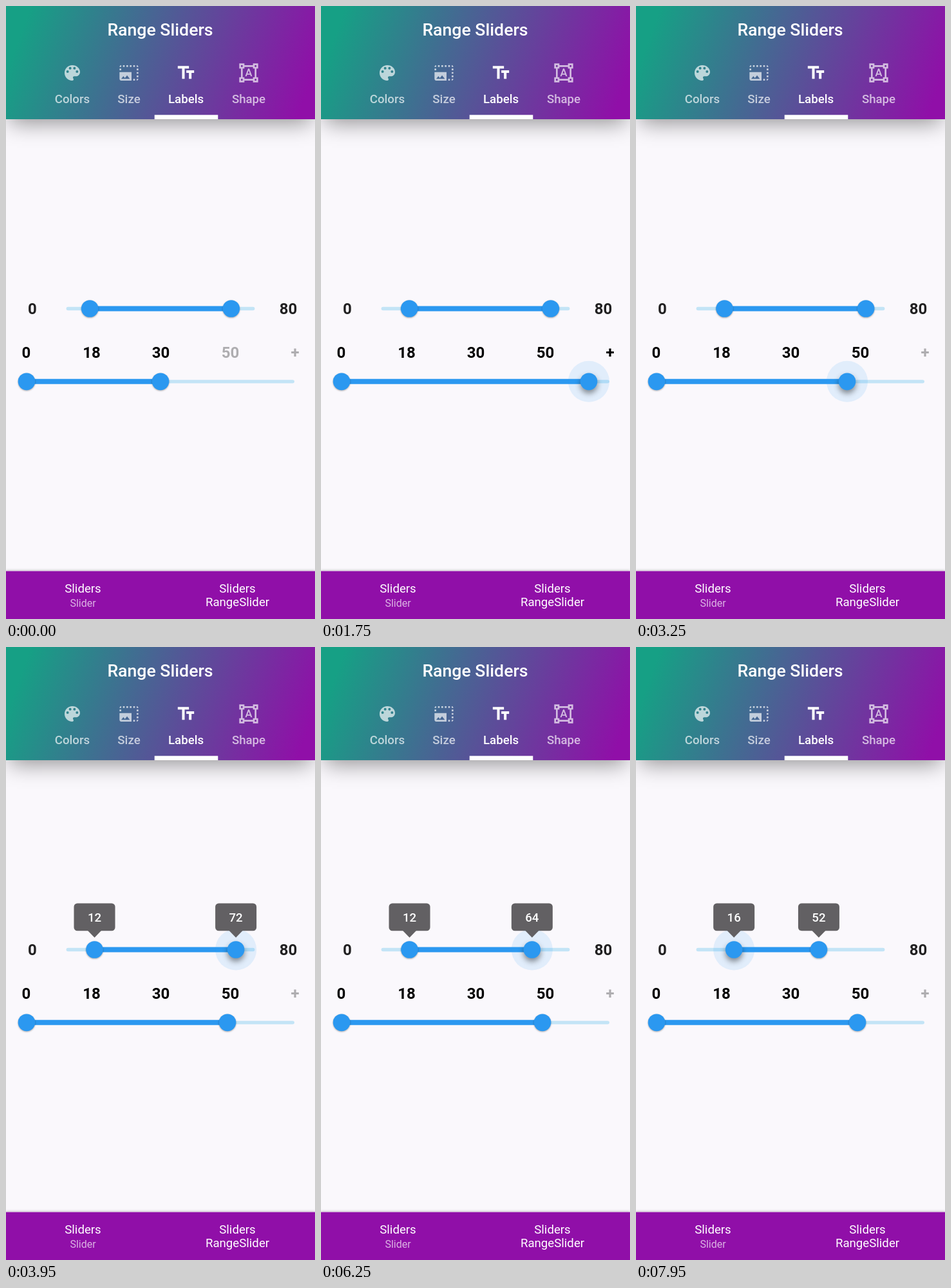
Write an HTML page that moves like this. It is 480x953 px and loops after 8 s.

```html
<!DOCTYPE html>
<html lang="en">
<head>
<meta charset="utf-8">
<title>Range Sliders</title>
<style>
  html, body { margin: 0; width: 100%; height: 100%; overflow: hidden; background: #faf8fc; }
  #header-shadow { position: absolute; left: 0; top: 0; width: 480px; height: 176px;
    box-shadow: 0 12px 32px -6px rgba(0, 0, 0, .42); }
  #bar-shadow { position: absolute; left: 0; top: 878px; width: 480px; height: 75px;
    box-shadow: 0 0 4px rgba(0, 0, 0, .3); }
  svg { position: absolute; left: 0; top: 0; display: block; }
  text { font-family: Roboto, sans-serif; text-anchor: middle; fill: #fff; }
  .title { font-size: 26.67px; font-weight: 500; }
  .tab { font-size: 18.67px; font-weight: 500; }
  .tab path { fill: #fff; fill-rule: evenodd; }
  .dim { opacity: .68; }
  .nav { font-size: 18.67px; }
  .small { font-size: 16px; }
  .value { font-size: 24px; font-weight: 700; fill: #000; }
  .tip { font-size: 18.67px; font-weight: 500; }
  .rail { stroke: #c3e4f6; stroke-width: 5.33; stroke-linecap: round; }
  .active { stroke: #2b98f0; stroke-width: 8; }
  .thumb { fill: #2b98f0; }
  .halo { fill: #2b98f0; fill-opacity: .12; }
  .bubble { fill: #626063; }
</style>
</head>
<body>
<div id="header-shadow"></div>
<div id="bar-shadow"></div>
<svg id="stage" width="480" height="953" viewBox="0 0 480 953">
  <defs>
    <linearGradient id="sky" gradientUnits="userSpaceOnUse" x1="0" y1="0" x2="480" y2="176">
      <stop offset=".07" stop-color="#16a085"/>
      <stop offset=".95" stop-color="#900fa8"/>
    </linearGradient>
  </defs>
  <rect width="480" height="176" fill="url(#sky)"/>
  <text class="title" x="239.5" y="46">Range Sliders</text>
  <g id="tabs"></g>
  <rect x="230.7" y="169.3" width="98.6" height="6.7" fill="#fff"/>
  <rect y="878.5" width="480" height="74.5" fill="#900fa8"/>
  <text class="nav" x="119.5" y="911.5">Sliders</text>
  <text class="nav small dim" x="119.5" y="934">Slider</text>
  <text class="nav" x="359.5" y="911.5">Sliders</text>
  <text class="nav" x="359.5" y="933">RangeSlider</text>
  <text class="value" x="41" y="479" fill-opacity=".87">0</text>
  <text class="value" x="438.5" y="479" fill-opacity=".87">80</text>
  <g id="marks"></g>
  <g id="sliders"></g>
</svg>
<script>
const LOOP = 8000;
const NS = 'http://www.w3.org/2000/svg';
const byId = id => document.getElementById(id);

function add(parent, tag, attrs, text) {
  const node = document.createElementNS(NS, tag);
  for (const key in attrs) node.setAttribute(key, attrs[key]);
  if (text !== undefined) node.textContent = text;
  return parent.appendChild(node);
}
function set(node, attrs) {
  for (const key in attrs) node.setAttribute(key, attrs[key]);
}

// Tabs, icons on a 24-unit grid
const dot = (x, y) => `M${x - 1.5} ${y}a1.5 1.5 0 1 0 3 0a1.5 1.5 0 1 0-3 0z`;
const palette = 'M12 3c-4.97 0-9 4.03-9 9s4.03 9 9 9c.83 0 1.5-.67 1.5-1.5 0-.39-.15-.74-.39-1.01' +
  '-.23-.26-.38-.61-.38-.99 0-.83.67-1.5 1.5-1.5H16c2.76 0 5-2.24 5-5 0-4.42-4.03-8-9-8z' +
  dot(6.5, 10.5) + dot(9.5, 6.5) + dot(14.5, 6.5) + dot(17.5, 10.5);
const square = (x, y) => `M${x} ${y}h2v2h-2z`;
const picture = [5, 9, 13, 17].map(x => square(x, 3)).join('') +
  [7, 11, 15].map(y => square(21, y)).join('') + square(1, 7) + square(17, 19) +
  'M3 3C2 3 1 4 1 5h2zM21 3v2h2c0-1-1-2-2-2zM23 19h-2v2c1 0 2-1 2-2z' +
  'M1 11v8c0 1.1.9 2 2 2h12V11zM3 19l2.5-3.21 1.79 2.15 2.5-3.22L13 19z';
const letters = 'M2.5 4v3h5v12h3V7h5V4zM21.5 9h-9v3h3v7h3v-7h3z';
const frame = 'M23 7V1h-6v2H7V1H1v6h2v10H1v6h6v-2h10v2h6v-6h-2V7z' +
  'M7 5h10v2h2v10h-2v2H7v-2H5V7h2z' +
  square(3, 3) + square(19, 3) + square(3, 19) + square(19, 19) +
  'M13.73 14h-3.49l-.73 2H7.89l3.4-9h1.4l3.41 9h-1.63zM10.69 12.74h2.61L12 8.91z';

[['Colors', 103, palette], ['Size', 191, picture], ['Labels', 279.5, letters], ['Shape', 377, frame]]
  .forEach(([name, x, icon]) => {
    const tab = add(byId('tabs'), 'g', { class: name === 'Labels' ? 'tab' : 'tab dim' });
    add(tab, 'path', { d: icon, transform: `translate(${x - 16} 88) scale(1.3333)` });
    add(tab, 'text', { x, y: 150.5 }, name);
  });

const marks = [['0', 31.5], ['18', 133], ['30', 240.5], ['50', 348.5], ['+', 449]]
  .map(([text, x]) => add(byId('marks'), 'text', { class: 'value', x, y: 546.5 }, text));

// Sliders
function makeSlider(left, right, y) {
  const root = byId('sliders');
  add(root, 'line', { class: 'rail', x1: left + 2.67, x2: right - 2.67, y1: y, y2: y });
  const active = add(root, 'line', { class: 'active', y1: y, y2: y });
  const halos = [0, 1].map(() => add(root, 'circle', { class: 'halo', cy: y }));
  const thumbs = [0, 1].map(() => add(root, 'circle', { class: 'thumb', cy: y, r: 13.33 }));
  return (xs, press) => {
    set(active, { x1: xs[0], x2: xs[1] });
    xs.forEach((x, i) => {
      const p = press[i];
      set(halos[i], { cx: x, r: 32 * p });
      set(thumbs[i], { cx: x });
      thumbs[i].style.filter =
        `drop-shadow(0 ${1 + 4 * p}px ${1 + 3 * p}px rgba(0,0,0,${.32 + .1 * p}))`;
    });
  };
}
const drawTop = makeSlider(93.6, 386.4, 470.5);
const drawBottom = makeSlider(32, 448, 583.8);

const tips = [0, 1].map(() => {
  const node = add(byId('sliders'), 'g', {});
  add(node, 'rect', { class: 'bubble', x: -32, y: -53.3, width: 64, height: 42.7, rx: 5.3 });
  add(node, 'path', { class: 'bubble', d: 'M-10.7-11h21.4L0 0z' });
  return { node, label: add(node, 'text', { class: 'tip', y: -25 }) };
});

// Motion
const clamp = v => Math.max(0, Math.min(1, v));
const ease = v => v * v * (3 - 2 * v);
const held = (t, from, to) => ease(clamp((t - from) / 100)) * (1 - ease(clamp((t - to) / 100)));

function along(points, t) {
  const i = points.findIndex(p => p[0] > t);
  if (i < 0) return points[points.length - 1][1];
  const [t0, v0] = points[i - 1], [t1, v1] = points[i];
  return v0 + (v1 - v0) * (t - t0) / (t1 - t0);
}
// Each step shifts the value by a fixed amount with a short glide
const stepped = (start, size, times, t) =>
  times.reduce((v, at) => v + size * ease(clamp((t - at) / 75)), start);

const bottomDrag = [[0, 240], [250, 240], [850, 320], [1750, 416], [1950, 448], [2150, 448],
  [2600, 240], [2750, 216], [2850, 216], [3300, 344]];
const rightSteps = [5700, 6000, 6300, 6600, 7050];
const leftSteps = [7800];

function draw(t) {
  const x = Math.round(along(bottomDrag, t) / 8) * 8;
  drawBottom([32, x], [0, held(t, 100, 3380)]);
  const reached = Math.round((x - 32) / 104);
  marks.forEach((mark, i) => mark.setAttribute('fill-opacity', i <= reached ? 1 : .3));

  const settle = t > 3500 ? 2 : 2 * (1 - Math.exp(-Math.max(0, t - 150) / 505));
  const values = [stepped(10 + settle, 4, leftSteps, t), stepped(70 + settle, -4, rightSteps, t)];
  const xs = values.map(v => 93.6 + v * 3.66);
  const right = Math.max(held(t, 3700, 4690), held(t, 5400, 7310));
  const left = held(t, 7610, LOOP + 100);
  drawTop(xs, [left, right]);

  const scale = Math.max(left, right);
  tips.forEach(({ node, label }, i) => {
    set(node, { transform: `translate(${xs[i]} 451.8) scale(${scale})`,
      visibility: scale > .01 ? 'visible' : 'hidden' });
    label.textContent = Math.round(values[i] / 4) * 4;
  });
}

const origin = performance.now();
function tick() {
  draw((performance.now() - origin) % LOOP);
  requestAnimationFrame(tick);
}
tick();
</script>
</body>
</html>
```
